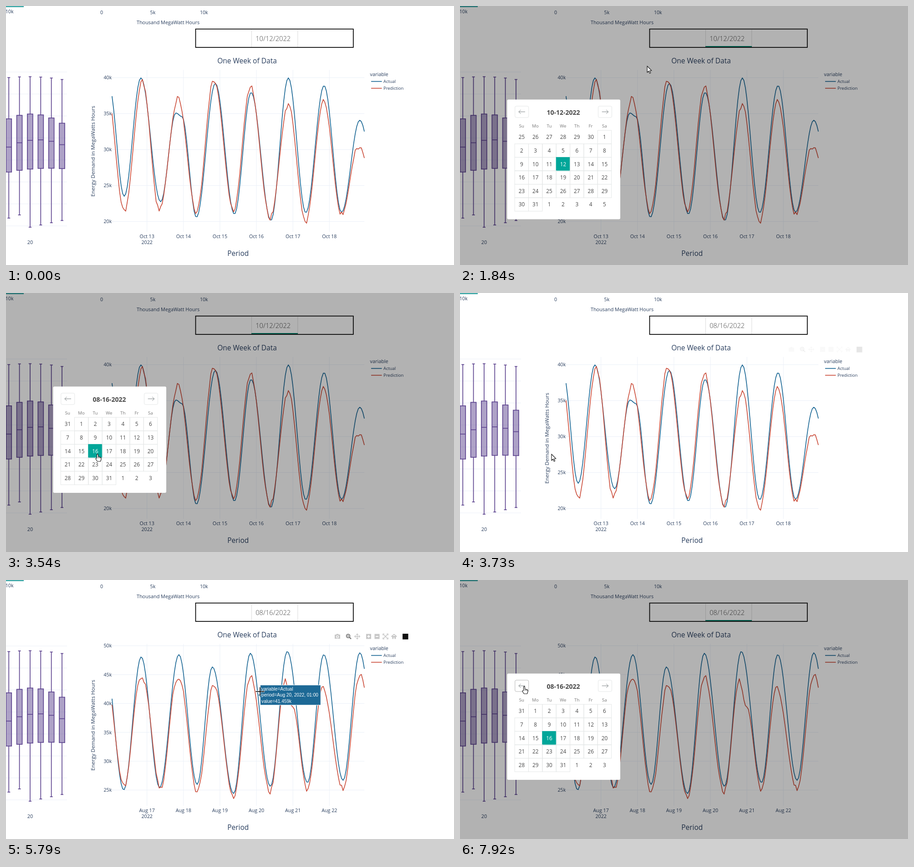
Recreate the animation shown at these times as an HTML page with a canvas. Size 984x569 px, loop 8 s.

```html
<!DOCTYPE html>
<html lang="en">
<head>
<meta charset="utf-8">
<title>Energy demand dashboard</title>
<style>
html, body { margin: 0; width: 100%; height: 100%; overflow: hidden; background: #fff; }
canvas { display: block; }
</style>
</head>
<body>
<canvas id="stage" width="984" height="569"></canvas>
<script>
const ctx = document.getElementById('stage').getContext('2d');
const LOOP = 8000, TAU = Math.PI * 2;
const SANS = '"Open Sans", sans-serif';
const INK = '#2a3f5f', GRID = '#ebf0f8', BLUE = '#1d6996', RED = '#cc503e', PURPLE = '#5f4690';
const PLOT = { x: 232.9, y: 140.5, r: 787.2, b: 496, hour: 3.3385 };

const clamp = v => Math.max(0, Math.min(1, v));
const ramp = (t, a, b) => clamp((t - a) / (b - a));
const easeOut = p => 1 - (1 - p) ** 3;
const easeBoth = p => p * p * (3 - 2 * p);
const inside = (p, x, y, r, b) => p.x >= x && p.x <= r && p.y >= y && p.y <= b;

function seeded(seed) {
  return () => (seed = (seed * 16807) % 2147483647) / 2147483647;
}

// Cosine swings between daily lows and highs, given as hour, y pairs.
// Roughness shows only where the curve is flat.
function swing(keys, rough = 0) {
  const rand = seeded(77), pts = [];
  for (let h = 0, k = 0; h <= 166; h++) {
    while (k + 4 < keys.length && h >= keys[k + 2]) k += 2;
    const [h0, y0, h1, y1] = keys.slice(k, k + 4);
    const c = Math.cos(Math.PI * (h - h0) / (h1 - h0));
    const jitter = rough * (rand() - 0.5) * Math.abs(c) ** 3;
    pts.push([PLOT.x + h * PLOT.hour, (y0 + y1) / 2 + c * (y0 - y1) / 2 + jitter]);
  }
  return pts;
}
const pair = (actual, prediction) => [
  { name: 'Actual', color: BLUE, pts: swing(actual) },
  { name: 'Prediction', color: RED, pts: swing(prediction, 13) }];

const october = {
  month: 'Oct', day: 12, top: 40, topY: 157.5, perK: 15.8, ticks: 5,
  lines: pair(
    [-2, 175, 8, 418, 19, 158, 32, 430, 42, 235, 46, 243, 55.5, 464, 68, 170, 80.5, 457, 91.5, 190,
      104.5, 471, 116, 158, 127.5, 454, 139.5, 175, 151, 453, 163, 251, 175, 420],
    [-3.5, 180, 8, 450, 20, 166, 31, 448, 43.5, 204, 55.5, 453, 67, 160, 80, 449, 91, 177,
      104, 466, 116, 217, 127.3, 474, 139.3, 210, 151, 459, 162, 308, 176, 440])
};
const august = {
  month: 'Aug', day: 16, top: 50, topY: 144.5, perK: 12.68, ticks: 6,
  lines: pair(
    [-4.6, 172, 7.7, 461, 19.2, 169, 31.3, 456, 44, 164, 56, 449, 66, 191, 80, 469, 91, 161,
      104.2, 453.2, 115.3, 157, 128.6, 445, 139.3, 164, 152, 440, 163, 160, 176, 440],
    [-5, 190, 8, 452, 18.5, 218, 20.3, 218, 32, 459, 42.5, 222, 44.5, 219, 56, 466, 67, 227, 80, 477,
      91, 212, 104, 466, 114, 222, 119, 285, 128.5, 460, 138.5, 238, 152, 460, 163, 208, 176, 420])
};

// y is the centre of the capital letters.
function text(str, x, y, size, { align = 'center', color = INK, weight = 400, family = SANS } = {}) {
  ctx.font = `${weight} ${size}px ${family}`;
  ctx.textAlign = align;
  ctx.fillStyle = color;
  ctx.fillText(str, x, y + size * 0.357);
}
function line(pts, color, width) {
  ctx.beginPath();
  pts.forEach(([x, y]) => ctx.lineTo(x, y));
  ctx.strokeStyle = color;
  ctx.lineWidth = width;
  ctx.stroke();
}
function rect(x, y, w, h, color) {
  ctx.fillStyle = color;
  ctx.fillRect(x, y, w, h);
}
function frame(x, y, w, h, color, width = 1) {
  ctx.strokeStyle = color;
  ctx.lineWidth = width;
  ctx.strokeRect(x, y, w, h);
}

function drawBoxes() {
  for (let i = 0; i < 8; i++) line([[0, 145 + i * 48.3], [134, 145 + i * 48.3]], GRID, 1);
  const bowl = (y, depth, centre) => i => y + depth * (i - centre) ** 2;
  const top = bowl(155.3, 0.6, 1.8), q1 = bowl(237.3, 2.4, 2.1), mid = bowl(294, 2.1, 2.75), q3 = bowl(356.4, 0.58, 3.8);
  for (let i = 0; i < 6; i++) {
    const x = 6.2 + i * 23.36, bottom = i < 2 ? 466 - 7 * i : 486 - 4.9 * (i - 2);
    line([[x, top(i)], [x, q1(i)]], PURPLE, 1.7);
    line([[x, q3(i)], [x, bottom]], PURPLE, 1.7);
    for (const y of [top(i), bottom]) line([[x - 3, y], [x + 3, y]], PURPLE, 1.7);
    rect(x - 6, q1(i), 12, q3(i) - q1(i), 'rgba(95,70,144,.5)');
    frame(x - 6, q1(i), 12, q3(i) - q1(i), PURPLE, 1.7);
    line([[x - 6, mid(i)], [x + 6, mid(i)]], PURPLE, 1.7);
  }
  text('20', 53, 519, 10.9);
}

function drawChart(c) {
  const dayX = i => PLOT.x + (23 + 24 * i) * PLOT.hour;
  for (let i = 0; i < 6; i++) {
    line([[dayX(i), PLOT.y], [dayX(i), PLOT.b]], GRID, 1);
    text(`${c.month} ${c.day + 1 + i}`, dayX(i), 506, 10.7);
  }
  text('2022', dayX(0), 519.5, 10.7);
  for (let i = 0; i < c.ticks; i++) {
    const y = c.topY + i * 5 * c.perK;
    line([[PLOT.x, y], [PLOT.r, y]], GRID, 1);
    text(c.top - i * 5 + 'k', 232.3, y, 10.7, { align: 'right' });
  }
  ctx.lineJoin = 'round';
  for (const l of c.lines) line(l.pts, l.color, 1.7);
  ctx.lineJoin = 'miter';
}

function drawPage(chart, date, focused) {
  rect(0, 0, 984, 569, '#fff');
  rect(0, 0, 39, 2.5, '#38a6a5');
  text('10k', 16.5, 12, 10.7, { align: 'right' });
  ['0', '5k', '10k'].forEach((s, i) => text(s, 210 + i * 112.4, 14, 10.7));
  text('Thousand MegaWatt Hours', 356, 36, 10.85);
  frame(416.5, 50.6, 346.3, 40.3, '#000', 1.7);
  for (const x of [539.5, 640.8]) line([[x, 52], [x, 90]], '#dbdbdb', 1);
  if (focused) rect(539, 88, 102, 2, '#00876f');
  text(date, 586.7, 71.3, 14.7, { color: '#484848', weight: 300 });

  drawBoxes();
  drawChart(chart);
  text('One Week of Data', 529.5, 120, 15.5);
  text('Period', 509.8, 543, 15.5);
  ctx.save();
  ctx.translate(191, 319);
  ctx.rotate(-Math.PI / 2);
  text('Energy Demand in MegaWatts Hours', 0, 0, 11.65);
  ctx.restore();
  text('variable', 799.5, 150.5, 10.85, { align: 'left' });
  chart.lines.forEach((l, i) => {
    const y = 165.7 + i * 15;
    line([[802, y], [825.5, y]], l.color, 1.7);
    text(l.name, 829, y + 0.3, 9.4, { align: 'left' });
  });
}

function drawTools(alpha) {
  if (alpha <= 0) return;
  const y = 124, soft = '#c7c7c7', dark = '#7c7c7c';
  const ring = (x, cy, r, color, w) => {
    ctx.beginPath();
    ctx.arc(x, cy, r, 0, TAU);
    ctx.strokeStyle = color;
    ctx.lineWidth = w;
    ctx.stroke();
  };
  const plus = (x, cy, r, color, w) => {
    line([[x - r, cy], [x + r, cy]], color, w);
    line([[x, cy - r], [x, cy + r]], color, w);
  };
  ctx.globalAlpha = alpha;
  // camera
  rect(722, y - 4, 12, 9, soft);
  rect(725.5, y - 5.5, 5, 2, soft);
  ring(728, y + 0.7, 2.4, '#fff', 1.3);
  // zoom
  ring(751.5, y - 1, 3.8, dark, 2);
  line([[754.2, y + 1.7], [758, y + 5.5]], dark, 2.4);
  plus(751.5, y - 1, 1.7, dark, 1.2);
  // pan
  for (let i = 0; i < 4; i++) {
    ctx.save();
    ctx.translate(771.5, y);
    ctx.rotate(i * TAU / 4);
    line([[0, 0], [5, 0]], soft, 1.4);
    line([[3.4, -2.2], [5.8, 0], [3.4, 2.2]], soft, 1.4);
    ctx.restore();
  }
  // zoom in and out
  for (const x of [796.5, 815]) rect(x - 5.5, y - 5.5, 11, 11, soft);
  plus(796.5, y, 3, '#fff', 2);
  line([[812, y], [818, y]], '#fff', 2);
  // autoscale
  for (const [sx, sy] of [[-1, -1], [1, -1], [1, 1], [-1, 1]]) {
    const p = (a, b) => [833.5 + sx * a, y + sy * b];
    line([p(2.5, 5.5), p(5.5, 5.5), p(5.5, 2.5)], soft, 1.6);
    line([p(0, 0), p(4, 4)], soft, 1.6);
  }
  // home
  line([[846.3, y + 0.5], [852.3, y - 4.6], [858.3, y + 0.5]], soft, 1.8);
  rect(848.3, y - 1, 8, 3, soft);
  for (const x of [848.3, 853.3]) rect(x, y, 3, 5.5, soft);
  rect(871, y - 6, 12.5, 12.5, '#111');
  ctx.globalAlpha = 1;
}

function drawHover(chart, pos) {
  let best = null, dist = 18;
  for (const l of chart.lines) {
    l.pts.forEach(([x, y], h) => {
      const d = Math.hypot(x - pos.x, y - pos.y);
      if (d < dist) { dist = d; best = { l, x, y, h }; }
    });
  }
  if (!best) return;
  const { l, x, y, h } = best, hour = h + 1;
  const rows = [
    'variable=' + l.name,
    `period=${chart.month} ${chart.day + Math.floor(hour / 24)}, 2022, ${String(hour % 24).padStart(2, '0')}:00`,
    `value=${(chart.top - (y - chart.topY) / chart.perK).toFixed(3)}k`];
  const family = '"Liberation Sans", Arial, sans-serif';
  ctx.font = '10.1px ' + family;
  const w = Math.max(...rows.map(r => ctx.measureText(r).width)) + 7;
  const left = x + 5.5;
  frame(left, y - 21.5, w, 43, '#fff', 1.8);
  rect(left, y - 21.5, w, 43, l.color);
  ctx.beginPath();
  ctx.moveTo(x + 1, y);
  ctx.lineTo(left + 0.5, y - 5);
  ctx.lineTo(left + 0.5, y + 5);
  ctx.fill();
  rows.forEach((r, i) => text(r, left + 2.2, y + (i - 1) * 13.2, 10.1, { align: 'left', color: '#fff', family }));
}

const CAL = { x: 103.5, y: 205.5, w: 248.5, cw: 30.35, ch: 29.6, left: 120.2, top: 273.2 };
const monthOf = (month, day, picked) => {
  const lead = new Date(2022, month - 1, 1).getDay();
  const days = new Date(2022, month, 0).getDate();
  return { month, day, picked, lead, days, rows: Math.ceil((lead + days) / 7) };
};
const oct = monthOf(10, 12, true), sep = monthOf(9, 12), aug = monthOf(8, 12), augPicked = monthOf(8, 16, true);

function drawMonth(m, dx) {
  const two = n => String(n).padStart(2, '0');
  text(`${two(m.month)}-${two(m.day)}-2022`, 227 + dx, 234.3, 14, { weight: 700, color: '#484848' });
  for (let i = 0; i < m.rows * 7; i++) {
    const n = i - m.lead + 1, own = n >= 1 && n <= m.days;
    const x = CAL.left + dx + (i % 7) * CAL.cw, y = CAL.top + Math.floor(i / 7) * CAL.ch;
    const on = m.picked && n === m.day;
    if (on) rect(x, y, CAL.cw, CAL.ch, '#00a699');
    if (own) frame(x, y, CAL.cw, CAL.ch, on ? '#00a699' : '#e4e7e7');
    const label = new Date(2022, m.month - 1, n).getDate();
    text(label, x + CAL.cw / 2, y + CAL.ch / 2 + 0.2, 11.8, { color: on ? '#fff' : '#484848' });
  }
}

function drawCalendar(from, to, p, pos) {
  rect(0, 0, 984, 569, 'rgba(0,0,0,.3)');
  const rows = from.rows + (to.rows - from.rows) * p;
  ctx.save();
  ctx.beginPath();
  ctx.roundRect(CAL.x, CAL.y, CAL.w, 85.5 + rows * CAL.ch, 3);
  ctx.fillStyle = '#fff';
  ctx.fill();
  ctx.clip();
  if (p < 1) drawMonth(from, CAL.w * p);
  drawMonth(to, CAL.w * (p - 1));
  ['Su', 'Mo', 'Tu', 'We', 'Th', 'Fr', 'Sa'].forEach((s, i) =>
    text(s, 135.3 + i * CAL.cw, 264, 9.7, { color: '#757575' }));
  for (const [x, dir] of [[120.8, -1], [303.5, 1]]) {
    const c = x + 15.2, tip = c + dir * 7;
    ctx.beginPath();
    ctx.roundRect(x, 220, 30, 25, 3);
    ctx.fillStyle = '#fff';
    ctx.fill();
    ctx.strokeStyle = inside(pos, x, 220, x + 30, 245) ? '#b8b8b8' : '#e4e7e7';
    ctx.lineWidth = 1;
    ctx.stroke();
    line([[c - 7, 232.5], [c + 7, 232.5]], '#82888a', 1);
    line([[tip - dir * 4.5, 228], [tip, 232.5], [tip - dir * 4.5, 237]], '#82888a', 1);
  }
  ctx.restore();
}

// Pointer moves: start, end, then the place it comes to rest.
const MOVES = [
  [120, 830, 634, 104], [830, 1100, 598, 71], [1570, 2200, 126, 225], [3000, 3270, 201, 354],
  [3730, 4820, 480, 338], [4900, 5790, 558, 245], [5960, 6870, 598, 71], [7050, 7920, 141, 234]];
function pointer(t) {
  const pos = { x: 950, y: 170 };
  for (const [a, b, x, y] of MOVES) {
    const e = easeBoth(ramp(t, a, b));
    pos.x += (x - pos.x) * e;
    pos.y += (y - pos.y) * e;
  }
  return pos;
}

const ARROW = [[0, 0], [0, 14], [3.2, 11], [5.5, 16], [7.7, 15], [5.4, 10.3], [9.8, 10]];
const HAND = [[-1.5, 9], [-1.5, 1], [0, -0.5], [1.5, 1], [1.5, 5.5], [4, 6], [6.5, 6.8], [8, 8.2], [8, 11.5],
  [6.5, 16], [-0.5, 16], [-4, 10.5], [-3.4, 9]];
function drawPointer(pos, open) {
  ctx.save();
  ctx.translate(pos.x, pos.y);
  ctx.lineJoin = 'round';
  if (!open && inside(pos, 539, 52, 641, 90)) {
    for (const [c, w] of [['#fff', 2.6], ['#222', 1.1]]) {
      line([[0, -6], [0, 6]], c, w);
      for (const s of [-6.5, 6.5]) line([[-3, s], [3, s]], c, w);
    }
  } else if (!open && inside(pos, PLOT.x, PLOT.y, PLOT.r, PLOT.b)) {
    for (const [c, w, r] of [['#fff', 3.2, 10], ['#000', 1.6, 9.5]]) {
      line([[-r, 0], [r, 0]], c, w);
      line([[0, -r], [0, r]], c, w);
    }
  } else {
    const hand = open && inside(pos, CAL.x, CAL.y, CAL.x + CAL.w, 440);
    ctx.beginPath();
    (hand ? HAND : ARROW).forEach(q => ctx.lineTo(...q));
    ctx.closePath();
    ctx.fillStyle = '#fff';
    ctx.fill();
    ctx.strokeStyle = '#222';
    ctx.lineWidth = 1.2;
    ctx.stroke();
    if (hand) for (const s of [1.5, 4, 6.2]) line([[s, 6.5], [s, 9]], '#222', 0.9);
  }
  ctx.restore();
}

function render(t) {
  const firstOpen = t >= 1570 && t < 3630, open = firstOpen || t >= 7050;
  const chart = t < 4370 ? october : august;
  const pos = pointer(t);
  const shown = (a, b, c, d) => Math.min(ramp(t, a, b), 1 - ramp(t, c, d));
  drawPage(chart, t < 3630 ? '10/12/2022' : '08/16/2022', open);
  drawTools(Math.max(shown(250, 500, 600, 830), shown(3700, 4000, 6600, 6850)));
  if (t >= 5180 && t < 6400) drawHover(chart, pos);
  if (firstOpen) {
    if (t < 2960) drawCalendar(oct, sep, easeOut(ramp(t, 2560, 2900)), pos);
    else drawCalendar(sep, t < 3540 ? aug : augPicked, easeOut(ramp(t, 2960, 3200)), pos);
  } else if (open) {
    drawCalendar(augPicked, augPicked, 1, pos);
  }
  if (t >= 120) drawPointer(pos, open);
}

const start = performance.now();
function tick() {
  render((performance.now() - start) % LOOP);
  requestAnimationFrame(tick);
}
tick();
</script>
</body>
</html>
```
